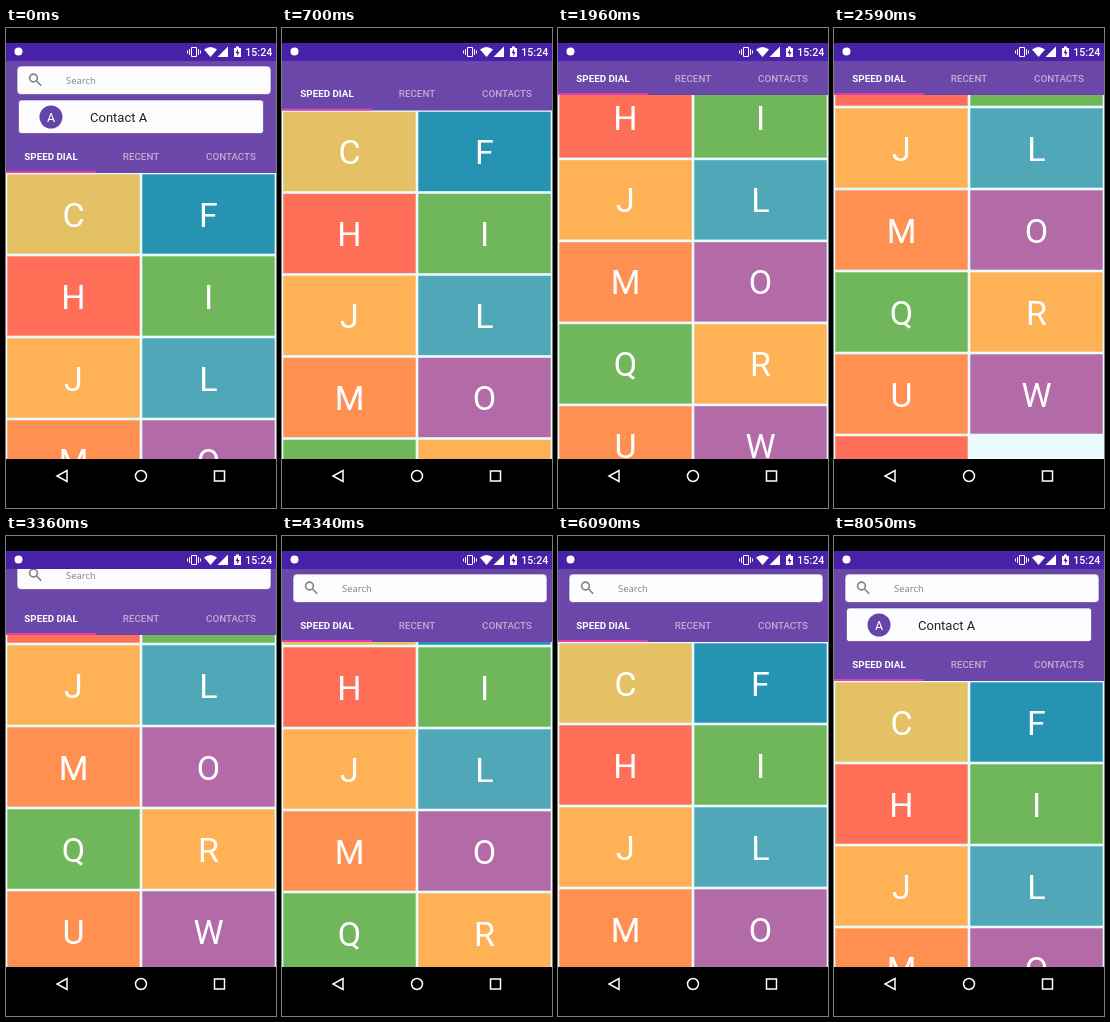
Animation of 270 by 480 pixels, one loop 9.8 s. Source, as an HTML page:

```html
<!DOCTYPE html>
<html lang="en">
<head>
<meta charset="utf-8">
<title>Contacts speed dial</title>
<style>
html, body { margin: 0; width: 100%; height: 100%; overflow: hidden; background: #000; }
svg { display: block; width: 100vw; height: 100vh; font-family: Roboto, sans-serif; }
.mid { text-anchor: middle; }
#tiles text { font-size: 34px; fill: #fff; }
.tab { font-size: 9.8px; font-weight: 500; fill: #c0afd0; }
.tab.on { fill: #fff; font-weight: 700; }
.line { fill: none; stroke: #fff; }
</style>
</head>
<body>
<svg viewBox="0 0 270 480">
  <defs><clipPath id="below"><rect y="69" width="270" height="80"/></clipPath></defs>
  <rect width="270" height="480" fill="#e9fbfd"/>
  <g id="tiles"></g>

  <g id="bar">
    <rect width="270" height="145" fill="#6a47a8"/>
    <text class="tab on mid" x="45" y="132">SPEED DIAL</text>
    <text class="tab mid" x="135" y="132">RECENT</text>
    <text class="tab mid" x="225" y="132">CONTACTS</text>
    <rect y="143" width="90" height="2" fill="#e03fae"/>
  </g>

  <g clip-path="url(#below)"><g id="card">
    <rect x="12.5" y="72" width="245" height="33.5" rx="3" fill="#fcfcff" stroke="#583a92" stroke-width=".6"/>
    <circle cx="45" cy="89" r="11.5" fill="#6444a8"/>
    <text class="mid" x="45" y="93.5" font-size="12.5" fill="#fff">A</text>
    <text x="84" y="93.7" font-size="13" fill="#222">Contact A</text>
  </g></g>

  <g id="search">
    <rect x="11" y="38" width="254" height="28.5" rx="4" fill="#fcfcff" stroke="#583a92" stroke-width=".6"/>
    <g fill="none" stroke="#808080" stroke-width="1.6">
      <circle cx="27.5" cy="50" r="3.9"/><path d="M30.5 53l4.7 4.7"/>
    </g>
    <text x="60" y="56" font-size="9.4" font-family="Noto Sans, sans-serif" fill="#8a8a88">Search</text>
  </g>

  <rect width="270" height="15" fill="#000"/>
  <rect y="15" width="270" height="18" fill="#4722a8"/>
  <g fill="#fff">
    <circle cx="12.5" cy="23.5" r="4"/>
    <path class="line" d="M185.5 19.5h5v9h-5zM183.5 21v6M192.5 21v6M181.5 22.5v3M194.5 22.5v3"/>
    <path d="M198 21.5Q204.5 16.5 211 21.5L204.5 29ZM222 18.5V29H211.5Z"/>
    <path d="M228 20h2v-1.5h3V20h2v9h-7z"/>
    <path d="M232 21l-2.5 4h1.6v3l2.5-4H232z" fill="#4722a8"/>
    <text x="239.3" y="28" font-size="10.6" font-weight="500">15:24</text>
  </g>

  <rect y="431" width="270" height="49" fill="#000"/>
  <g class="line" stroke-width="1.5">
    <path d="M61 442.5v11L51 448z"/>
    <circle cx="135" cy="448" r="5.5"/>
    <rect x="208.5" y="443" width="10" height="10"/>
  </g>
</svg>
<script>
const LOOP = 9800, STEP = 70, FOLD = 39, LOWEST = 233, TURN = 2800;
const $ = id => document.getElementById(id);
const clamp = v => Math.max(0, Math.min(FOLD, v));
const shift = (id, y) => $(id).setAttribute("transform", `translate(0 ${-y})`);

const red = "#ff6e56", green = "#70b65a", amber = "#ffb255", orange = "#ff9052", plum = "#b36ba8";
const tiles = [
  ["C", "#e3c164"], ["F", "#2693b3"], ["H", red], ["I", green],
  ["J", amber], ["L", "#4fa7b8"], ["M", orange], ["O", plum],
  ["Q", green], ["R", amber], ["U", orange], ["W", plum], ["Y", red]
];
$("tiles").innerHTML = tiles.map(([letter, color], i) => {
  const x = i % 2 * 135 + 1.3, y = 146.3 + (i >> 1) * 82;
  return `<rect x="${x}" y="${y}" width="132.4" height="79.4" fill="${color}"/>
    <text class="mid" x="${x + 66.2}" y="${y + 52.2}">${letter}</text>`;
}).join("");

// [time, list scroll]
const keys = [
  [0, 0], [70, 0], [1400, 132], [2590, 230], [2700, LOWEST], [2950, LOWEST],
  [3360, 201], [4340, 117], [5300, FOLD], [6250, FOLD], [7400, 0], [LOOP, 0]
];
function scrollAt(t) {
  const i = keys.findIndex(k => k[0] > t);
  const [t0, a] = keys[i - 1], [t1, b] = keys[i];
  return a + (b - a) * (t - t0) / (t1 - t0);
}

function draw(t) {
  const scroll = scrollAt(t);
  const fold = clamp(scroll);
  // The search box leaves after the card, and returns as soon as the list turns back.
  const hide = clamp(scroll - (t < TURN ? FOLD : LOWEST - FOLD));
  shift("tiles", scroll);
  shift("card", fold);
  shift("bar", fold + hide);
  shift("search", hide * 1.86);
}

const start = performance.now();
function tick() {
  const t = (performance.now() - start) % LOOP;
  draw(Math.floor(t / STEP) * STEP);
  requestAnimationFrame(tick);
}
tick();
</script>
</body>
</html>
```
